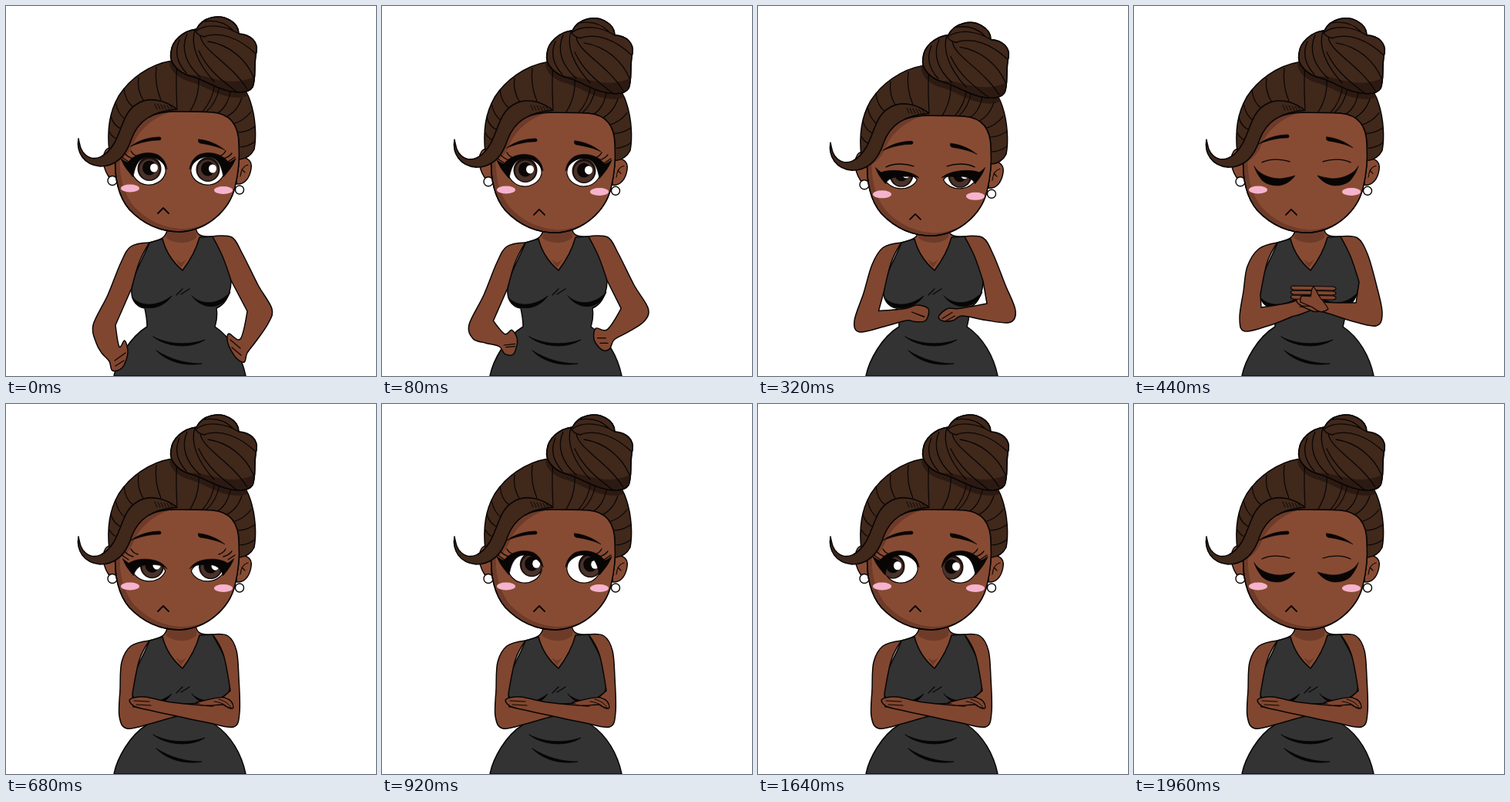
An HTML page with a canvas for the animation above (2000 ms loop, 480 by 480 pixels).

```html
<!DOCTYPE html>
<html lang="en">
<head>
<meta charset="utf-8">
<title>Eye roll</title>
<style>
  html, body { margin: 0; width: 100%; height: 100%; overflow: hidden; background: #fff; }
  canvas { display: block; width: 480px; height: 480px; }
</style>
</head>
<body>
<canvas id="stage" width="480" height="480"></canvas>
<script>
const ctx = document.getElementById('stage').getContext('2d');
const LOOP = 2000, STEP = 40;
const SKIN = '#874b33', ARM = '#804630', SHADE = '#6e3b29', HAIR = '#40281b',
      HAIR_DARK = '#2c1a12', DRESS = '#333333', INK = '#080505';

const lerp = (a, b, k) => a + (b - a) * k;
const mix = (a, b, k) => a.map((v, i) => lerp(v, b[i], k));
const ease = k => k * k * (3 - 2 * k);

// keys: [time, [values]] pairs, eased between neighbours
function at(keys, t, curve = ease) {
  let i = 0;
  while (i < keys.length - 2 && t >= keys[i + 1][0]) i++;
  const [t0, a] = keys[i], [t1, b] = keys[i + 1];
  const k = Math.min(1, Math.max(0, (t - t0) / (t1 - t0)));
  return mix(a, b, curve(k));
}

function draw(path, fill, width = 1.5, line = INK) {
  const p = typeof path === 'string' ? new Path2D(path) : path;
  if (fill) { ctx.fillStyle = fill; ctx.fill(p); }
  if (width) { ctx.lineWidth = width; ctx.strokeStyle = line; ctx.stroke(p); }
}

function oval(x, y, rx, ry, fill, width = 0) {
  const p = new Path2D();
  p.ellipse(x, y, rx, ry, 0, 0, 7);
  draw(p, fill, width);
}

function layer(dx, dy, body) {
  ctx.save();
  ctx.translate(dx, dy);
  body();
  ctx.restore();
}

function clipped(path, body) {
  ctx.save();
  ctx.clip(typeof path === 'string' ? new Path2D(path) : path);
  body();
  ctx.restore();
}

// Closed smooth outline; the listed points stay sharp
function outline(n, corners) {
  const count = n.length / 2, p = new Path2D();
  const pt = i => { const j = (i + count) % count; return [n[2 * j], n[2 * j + 1]]; };
  const slope = i => {
    if (corners.includes((i + count) % count)) return [0, 0];
    const a = pt(i - 1), b = pt(i + 1);
    return [(b[0] - a[0]) / 6, (b[1] - a[1]) / 6];
  };
  p.moveTo(...pt(0));
  for (let i = 0; i < count; i++) {
    const a = pt(i), b = pt(i + 1), s = slope(i), e = slope(i + 1);
    p.bezierCurveTo(a[0] + s[0], a[1] + s[1], b[0] - e[0], b[1] - e[1], b[0], b[1]);
  }
  p.closePath();
  return p;
}

function curves(n) {
  const p = new Path2D();
  p.moveTo(n[0], n[1]);
  for (let i = 2; i < n.length; i += 6) p.bezierCurveTo(...n.slice(i, i + 6));
  p.closePath();
  return p;
}

// Arms: shoulder, outer edge, elbow, hand, inner elbow, armhole
const leftArm = [
  [0, [186,307, 162,312, 149,333, 132,375, 113,414, 117,437, 124,450, 134,461,
       138,473, 151,469, 158,450, 154,434, 147,442, 142,414, 163,366, 173,332]],
  [200, [186,307, 162,312, 149,333, 132,375, 113,412, 120,424, 150,418, 180,413,
         191,419, 200,425, 202,408, 190,400, 178,401, 148,400, 163,366, 173,332]],
  [440, [186,307, 162,315, 147,338, 142,370, 137,405, 144,422, 180,413, 205,403,
         216,400, 235,391, 240,378, 222,376, 205,384, 165,391, 164,374, 173,332]],
  [520, [186,307, 162,314, 150,335, 148,370, 147,405, 157,421, 190,414, 222,405,
         270,395, 292,392, 293,384, 280,382, 250,388, 165,393, 164,376, 173,332]]
];
const rightArm = [
  [0, [268,299, 293,300, 307,322, 327,362, 345,393, 340,412, 325,434, 313,450,
       309,462, 298,456, 288,438, 289,425, 304,432, 313,396, 292,356, 281,325]],
  [200, [268,299, 293,300, 307,322, 327,362, 346,392, 339,406, 310,407, 284,407,
         274,420, 266,431, 256,426, 260,408, 275,401, 306,387, 292,356, 281,325]],
  [440, [268,299, 290,301, 303,322, 314,360, 322,398, 314,415, 280,408, 246,397,
         232,396, 213,386, 213,379, 232,377, 246,384, 288,385, 292,358, 281,325]],
  [520, [268,299, 288,301, 299,320, 302,355, 303,400, 295,419, 260,413, 222,405,
         185,397, 166,392, 161,383, 180,380, 215,387, 268,392, 291,372, 282,325]]
];
// Finger creases: two short segments per hand
const leftFingers = [
  [0, [141,460, 155,450, 142,467, 153,460]],
  [200, [184,410, 199,421, 189,406, 202,414]],
  [440, [215,384, 232,386, 215,390, 230,392]],
  [520, [268,387, 284,387, 270,391, 284,391]]
];
const rightFingers = [
  [0, [291,433, 304,444, 293,443, 305,453]],
  [200, [262,427, 270,411, 268,429, 275,414]],
  [440, [216,384, 234,384, 218,389, 236,390]],
  [520, [166,385, 186,386, 169,390, 188,391]]
];

function arm(shape, fingers, t) {
  draw(outline(at(shape, t, k => k), [0, 13, 14]), ARM);
  const f = at(fingers, t, k => k);
  draw(`M${f.slice(0, 2)}L${f.slice(2, 4)}M${f.slice(4, 6)}L${f.slice(6)}`, null, 1.2);
}

const dress = 'M186 307L203 302C207 318 216 332 229 343C239 330 247 315 251 300L268 299' +
  'C278 318 292 340 292 358C291 377 283 388 273 392C275 405 272 412 271 416' +
  'C292 430 306 455 311 480L140 480C144 460 160 430 183 416C183 405 181 398 180 392' +
  'C168 390 162 380 163 368C165 345 180 325 186 307Z';

function body(t) {
  draw('M209 286C210 298 204 303 186 307L229 347L268 299C252 300 247 297 246 286Z', SKIN);
  draw('M210 288L246 288C247 297 249 300 245 302C236 309 219 309 208 301Z', SHADE, 0);
  draw('M220 329L227 339L234 329L227 333Z', SHADE, 0);
  draw(dress, DRESS);
  draw('M164 378C174 391 198 390 215 376C202 396 172 397 164 378Z' +
       'M241 376C254 389 276 388 291 371C282 394 256 396 241 376Z', INK, .8);
  draw('M221 375L229 367M227 374L238 367', null, 1.2);
  draw('M191 429C212 440 238 440 258 433C240 445 208 443 191 429Z' +
       'M195 447C214 459 234 464 254 464C232 468 208 461 195 447Z', INK, .8);
  arm(leftArm, leftFingers, t);
  arm(rightArm, rightFingers, t);
  if (t >= 400 && t < 480) {
    for (let i = 0; i < 3; i++) {
      const y = 363 + i * 6;
      draw(`M207 ${y}L258 ${y + 1}C264 ${y + 2} 263 ${y + 6} 257 ${y + 6}L207 ${y + 5}` +
           `C202 ${y + 4} 202 ${y + 1} 207 ${y}Z`, ARM, 1.2);
    }
    draw('M216 379C216 375 221 376 229 377C231 372 229 367 233 364C237 369 238 374 242 379' +
         'C247 385 250 389 252 393C245 399 239 397 232 391L216 384Z', ARM, 1.2);
  }
  if (t >= 480) {
    draw('M247 387C262 384 276 379 284 381C291 383 295 388 295 394C292 397 287 393 281 390' +
         'C273 390 267 392 260 391', ARM, 1.3);
    draw('M276 383C284 385 289 389 292 394M270 386C278 387 283 389 287 393', null, 1);
  }
}

const hair = 'M134 190C131 160 134 138 146 117C160 95 185 76 215 71L280 84' +
  'C300 93 312 108 317 124C324 145 325 170 322 186C318 194 312 198 303 199L150 205Z';
const face = 'M142 195C140 222 146 248 160 264C178 283 200 293 226 293C262 291 290 264 297 235' +
  'C302 215 303 195 302 180C302 155 292 140 268 138C250 137 236 137 222 137C190 136 160 150 142 195Z';
const bun = 'M247 30C255 14 277 10 290 18C299 23 302 30 302 36C318 37 327 47 325 59' +
  'C321 75 325 94 320 105C315 113 302 113 288 110C268 105 256 95 240 91' +
  'C224 87 211 74 214 60C215 45 230 32 247 30Z';
const fringe = 'M94 172C96 182 97 188 103 193C115 203 130 196 141 177C151 158 153 137 170 127' +
  'C186 117 206 122 222 134C190 136 171 150 163 172C156 194 144 208 122 208C101 206 91 190 94 172Z';
const strands = 'M172 92C170 104 174 116 179 124M195 79C193 95 196 110 201 122' +
  'M222 76C220 95 221 115 222 132M250 92C251 110 246 125 239 136M271 101C269 116 262 129 255 137' +
  'M277 105C274 120 267 131 260 137M291 111C289 124 282 135 274 139M306 119C302 131 294 140 285 144' +
  'M318 137C311 146 302 151 294 153M322 157C315 162 307 164 299 164M323 176C316 181 309 183 302 183' +
  'M153 107C154 117 158 126 165 131M142 125C144 135 148 143 156 148M136 143C138 151 143 157 151 160' +
  'M134 163C137 169 141 172 146 173';
const twists = 'M245 31C239 50 248 74 270 98M235 36C226 56 234 76 252 92M225 44C218 60 223 75 234 87' +
  'M252 38C254 58 292 74 313 108M262 46C290 50 312 70 321 92M256 40C278 32 303 42 324 62' +
  'M247 32C262 22 284 25 302 36M257 20C270 18 284 21 294 31M250 58C262 84 282 98 299 111' +
  'M245 31C247 36 250 39 258 40';

// Eye shapes for the left side; the right side mirrors them
const whiteOpen = [163,213, 166,198,178,193,190,195, 203,197,208,208,207,216,
  204,228,192,233,183,232, 172,231,164,222,163,213];
const whiteShut = [163,217, 170,222,180,224,187,224, 196,224,202,222,206,219,
  202,222,196,226,186,226, 175,226,168,222,163,217];
const lashOpen = [149,198, 153,200,155,202,158,203, 168,190,186,188,197,193, 204,197,208,204,209,212,
  203,201,195,196,186,196, 174,196,168,204,165,222, 157,213,152,206,149,198];
const lashShut = [156,206, 158,209,160,211,162,213, 170,219,180,222,190,222, 197,221,203,220,209,218,
  205,224,196,231,186,231, 177,231,170,228,166,224, 162,219,158,213,156,206];

const gazeKeys = [[0, [0, 0]], [560, [0, 0]], [840, [9, -2]], [960, [8, -3]],
  [1240, [-3, -6]], [1560, [-11, -1]], [1680, [-11, 0]]];
const lidKeys = [[0, [0]], [240, [0]], [400, [1]], [560, [1]], [760, [0]], [1680, [0]], [1880, [1]]];
const liftKeys = [[0, [0]], [200, [0]], [440, [5]]];

function eye(mirror, cx, cy, gaze, shut) {
  const flip = p => {
    if (!mirror) return p;
    const m = new Path2D();
    m.addPath(p, new DOMMatrix([-1, 0, 0, 1, 447, 0]));
    return m;
  };
  const white = flip(curves(mix(whiteOpen, whiteShut, shut)));
  if (shut < .98) {
    draw(white, '#fff', 1.2);
    clipped(white, () => {
      const x = cx + gaze[0], y = cy + gaze[1];
      oval(x, y, 15.5, 16, '#1c110d');
      oval(x, y + 1, 13, 13.5, '#49322a');
      oval(x, y - 1, 9, 9.5, '#0b0706');
      oval(x + 6, y - 1, 5, 5.5, '#fff');
    });
  }
  draw(flip(curves(mix(lashOpen, lashShut, shut))), INK, .6);
  if (shut < .5) draw(flip(new Path2D('M154 191C157 195 161 197 165 198M162 188C164 192 167 194 171 195M150 196L159 202')), null, 1.3);
  else draw(flip(new Path2D('M166 201C176 196 191 196 202 200')), null, 1.3);
}

function features(t) {
  const gaze = at(gazeKeys, t), [shut] = at(lidKeys, t), [lift] = at(liftKeys, t);
  oval(161, 236.5, 12, 5, '#f5b3cd');
  oval(282, 239, 12, 5, '#f5b3cd');
  eye(false, 186, 211, gaze, shut);
  eye(true, 262, 212, gaze, shut);
  layer(0, -lift, () => draw('M162 182C172 174 186 170 200 170C202 172 201 174 199 174C187 174 174 177 162 182Z' +
    'M250 173C262 174 274 179 284 187C274 182 264 180 252 178C249 177 249 174 250 173Z', INK, .6));
  draw('M197 269L204 262L211 269', null, 1.8);
}

function head(t) {
  const dip = t < 520 ? Math.sin(Math.PI * t / 520) ** 2 : 0;
  layer(0, 6 * dip, () => {
    draw('M136 184C124 184 123 206 133 221L146 226L146 188Z', SKIN);
    draw('M300 200C309 193 320 199 318 211C316 224 309 232 299 231Z', SKIN);
    draw('M304 221C305 212 309 207 314 206M306 212L310 216', null, 1.1);
    oval(138, 226.5, 6, 6, '#fff', 1.4);
    oval(303, 238.5, 5.5, 5.5, '#fff', 1.4);
    layer(0, dip, () => draw(hair, HAIR));
    clipped(hair, () => layer(-2, 7 + 3 * dip, () => draw(bun, HAIR_DARK, 0)));
    layer(0, dip, () => draw(strands, null, 1.2));
    draw(face, SHADE);
    clipped(face, () => {
      layer(6, -4, () => draw(face, SKIN, 0));
      draw('M296 165C301 190 299 235 275 268L310 250L310 160Z', SKIN, 0);
      draw('M224 134C196 141 174 157 165 180C160 192 150 200 140 205L140 140Z', SHADE, 0);
    });
    draw(face);
    layer(0, 3 * dip, () => features(t));
    draw(fringe, HAIR, 1.6);
    let ticks = '';
    for (let x = 193; x < 217; x += 4) ticks += `M${x} ${127 + (x - 193) / 8}L${x + 3} 134`;
    draw(ticks, null, .9);
    layer(0, 2.5 * dip, () => {
      draw(bun, HAIR);
      clipped(bun, () => draw('M236 90C262 86 285 108 322 92L322 116L280 114Z', HAIR_DARK, 0));
      draw(twists, null, 1.3);
      draw(bun);
    });
  });
}

function frame(now) {
  const t = Math.floor((now % LOOP) / STEP) * STEP;
  ctx.fillStyle = '#fff';
  ctx.fillRect(0, 0, 480, 480);
  ctx.lineJoin = ctx.lineCap = 'round';
  body(t);
  head(t);
}

const start = performance.now();
function tick() {
  frame(performance.now() - start);
  requestAnimationFrame(tick);
}
tick();
</script>
</body>
</html>
```
